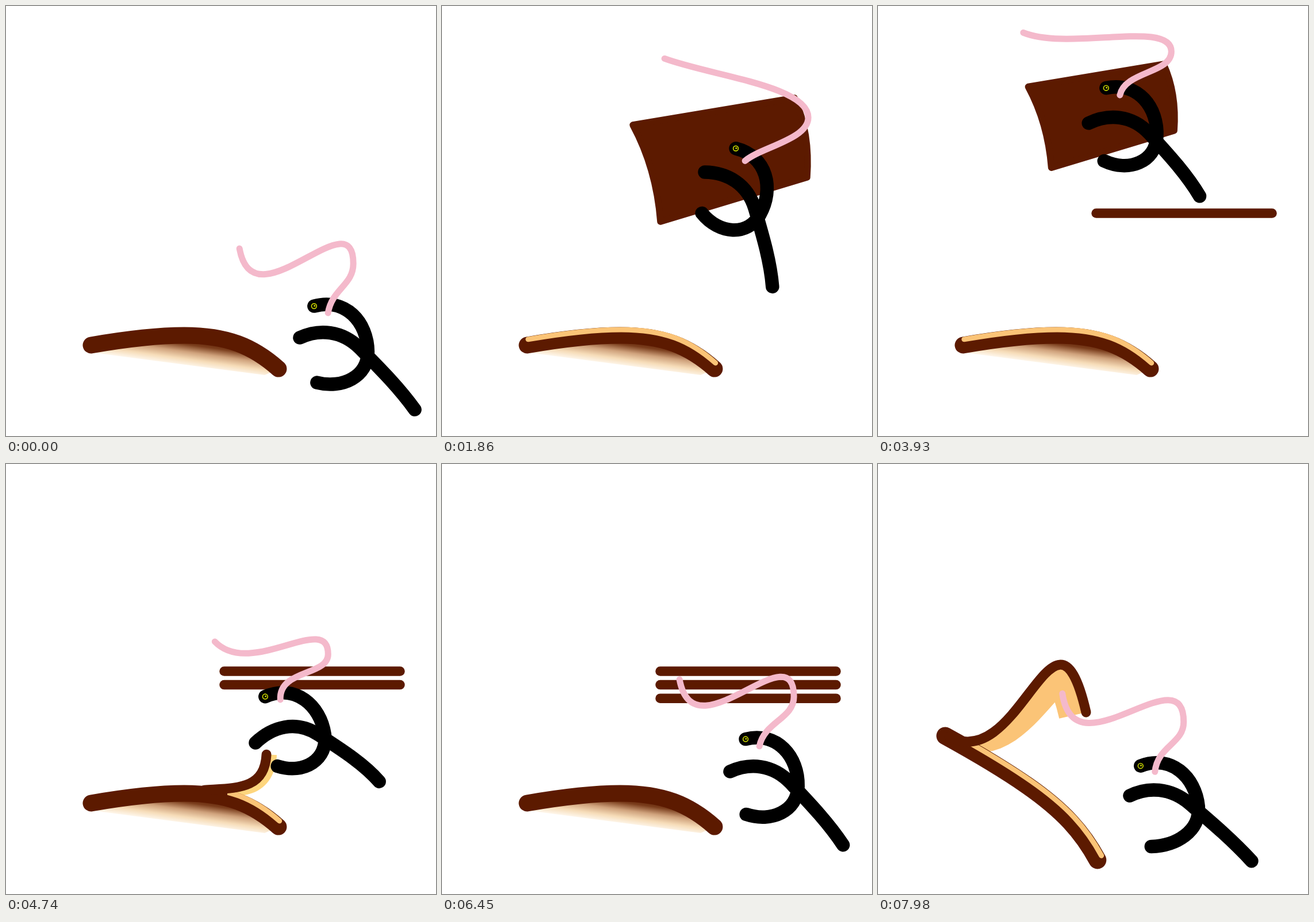
Recreate the animation shown at these times as an HTML page with a canvas. Size 748 px wide and 748 px high, loop 8000 ms.

```html
<!DOCTYPE html>
<html lang="en">
<head>
<meta charset="utf-8">
<title>Bark peeler</title>
<style>
html, body { margin: 0; width: 100%; height: 100%; overflow: hidden; background: #fff; }
canvas { display: block; width: 100vw; height: 100vh; }
</style>
</head>
<body>
<canvas id="stage" width="748" height="748"></canvas>
<script>
const ctx = document.getElementById('stage').getContext('2d');
const LOOP = 8000, CYCLE = 2160, STEP = 30;
const BARK = '#5c1a00', WOOD = '#fbc477', PINK = '#f4b9cb', EYE = '#c8d400';

const clamp = v => Math.max(0, Math.min(1, v));
const ramp = (t, a, b) => clamp((t - a) / (b - a));
const lerp = (a, b, k) => a + (b - a) * k;
const mix = (p, q, k) => [lerp(p[0], q[0], k), lerp(p[1], q[1], k)];
const polar = (length, degrees) =>
  [length * Math.cos(degrees * Math.PI / 180), length * Math.sin(degrees * Math.PI / 180)];
const add = (p, q) => [p[0] + q[0], p[1] + q[1]];
// Point at (along, across) in a frame with the given origin and direction.
const local = (origin, degrees, along, across) =>
  add(add(origin, polar(along, degrees)), polar(across, degrees + 90));

// Beak position, body angle and jaw opening; the ribbon has a reach, a tip and a wave.
const bird = (x, y, angle, jaw, reach, tipX, tipY, wave) =>
  ({ x, y, angle, jaw, reach, tipX, tipY, wave });
const ready = bird(511, 577, 32, .8, 44, -154, -112, 1);
const lift = bird(434, 485, 17.4, .1, 83, -114, -101, .5);
const pull = bird(191, 294, -19, 0, 153, -8, -99, 0);
const letGo = bird(298, 226, 13.2, .45, 81, -169, -67, .3);
const carry = bird(457, 289, 59.4, .5, 110, -140, -178, .25);
const dive = bird(501, 535, 33, .7, 60, -139, -116, 1);
const lunge = bird(438, 577, 28.2, 1.1, 50, -161, -136, 1.05);
const move = (pose, dx, dy) => ({ ...pose, x: pose.x + dx, y: pose.y + dy });

const birdStart = [
  [-30, dive], [0, ready], [90, move(ready, -12, 25)], [270, move(lift, 18, 108)],
  [420, lift], [810, move(pull, 22, 75)], [960, move(pull, -38, -11)],
  [1050, pull], [1140, letGo]];
const birdPeels = [...birdStart,
  [1230, move(letGo, 40, -21)], [1380, pull], [1500, move(pull, -71, 40)],
  [1710, move(letGo, 0, -49)], [1860, carry], [2040, move(dive, -20, -130)],
  [2130, dive], [2160, ready], [2250, move(ready, -12, 25)]];
const birdFails = [...birdStart, [1320, ready], [1380, ready], [1500, lunge]];

// Where the strip leaves the trunk, its heading at the tip, and its stiffness at both ends.
const strip = (root, heading, arm, grip, width) => ({ root, heading, arm, grip, width });
const stripStart = [
  [270, strip(420, 215, 15, 20, 4)], [420, strip(345, 93, 62, 55, 18)],
  [1050, strip(175, 114, 142, 135, 44)], [1140, strip(200, 162, 129, 145, 46)]];
const stripPeels = [...stripStart, [1380, stripStart[2][1]]];
const stripFails = [...stripStart, [1500, strip(155, 257, 240, 140, 48)]];

// Cubic interpolation through timed poses.
function sample(keys, t) {
  const last = keys.length - 1;
  if (t <= keys[0][0]) return keys[0][1];
  if (t >= keys[last][0]) return keys[last][1];
  const i = keys.findIndex(key => key[0] > t) - 1;
  const [ta, a] = keys[i], [tb, b] = keys[i + 1];
  const [tp, p] = keys[Math.max(0, i - 1)], [tn, n] = keys[Math.min(last, i + 2)];
  const h = tb - ta, u = (t - ta) / h, w = 1 - u;
  const at = k => a[k] * (1 + 2 * u) * w * w + b[k] * u * u * (3 - 2 * u) +
    h * u * w * (w * (b[k] - p[k]) / (tb - tp) - u * (n[k] - a[k]) / (tn - ta));
  return Object.fromEntries(Object.keys(a).map(k => [k, at(k)]));
}

// Starts a path of joined cubic curves: start, then control, control, end, ...
function curve(points) {
  ctx.beginPath();
  ctx.moveTo(...points[0]);
  for (let i = 1; i < points.length; i += 3) {
    ctx.bezierCurveTo(...points[i], ...points[i + 1], ...points[i + 2]);
  }
}

function stroke(color, width) {
  ctx.strokeStyle = color;
  ctx.lineWidth = width;
  ctx.stroke();
}

function fill(color) {
  ctx.fillStyle = color;
  ctx.fill();
}

function circle([x, y], r) {
  ctx.beginPath();
  ctx.arc(x, y, r, 0, 7);
}

const BODY = [[20, -30], [55, -49], [99, -39], [144, -28.5], [191, -18]];
const HEAD = [[-13, -55], [31, -92], [83, -90.5], [126, -89], [146, -43.5]];

const beakOf = pose => [pose.x, pose.y];
const jawOf = ({ x, y, angle, jaw }) => local([x, y], angle, 46 + 26 * jaw, 24 + 33 * jaw);

function drawBird(pose) {
  const { angle, jaw, reach, tipX, tipY, wave } = pose;
  const beak = beakOf(pose), chin = jawOf(pose);
  const eye = local(beak, angle, -8, -86 + 44 * jaw - 14 * jaw * jaw);
  const headAngle = Math.atan2(chin[1] - eye[1], chin[0] - eye[0]) * 180 / Math.PI;
  const arch = 1.22 - .25 * jaw;

  curve([beak, ...BODY.map(([u, v]) => local(beak, angle, u, v * arch)),
    local(beak, angle, 224 + 15 * jaw, 0)]);
  stroke('#000', 23.5);
  curve([eye, ...HEAD.map(([u, v]) => local(eye, headAngle, u, v)), chin]);
  stroke('#000', 23.5);
  circle(eye, 4.4);
  stroke(EYE, 1.7);
  circle(add(eye, [.8, -.6]), 1.5);
  fill(EYE);

  const base = add(eye, polar(27, angle - 6));
  const side = add(base, [reach, -72 - 14 * wave]);
  const tip = add(base, [tipX, tipY]);
  curve([base, add(base, [-15 + .7 * angle, -65 + .7 * angle]), add(side, [0, 38]), side,
    add(side, [0, -35 - 80 * wave]), add(tip, [100 - 75 * wave, -5 + 140 * wave]), tip]);
  stroke(PINK, 11);
}

const TRUNK = [[148, 590], [200, 581], [255, 573], [310, 573], [385, 573], [430, 592], [474, 631]];

// Maps a point of the resting trunk to the trunk as it is torn up and straightened.
function onTrunk([x, y], tilt) {
  const dx = x - 148, dy = y - 590, size = 1 + .04 * tilt;
  const along = dx * .992 + dy * .125, across = dy * .992 - dx * .125;
  return local([148 - 31 * tilt, 590 - 117 * tilt], 7.2 + 32 * tilt,
    along * size, across * size * (1 - .4 * tilt));
}

function drawShadow(tilt) {
  const place = p => onTrunk(p, tilt);
  const shade = ctx.createLinearGradient(...place([315, 627]), ...place([322, 577]));
  ['#fffaf2', '#f6dcb8', '#cfa27c', '#7a3d1c', BARK]
    .forEach((color, i) => shade.addColorStop(i / 4, color));
  ctx.globalAlpha = clamp(1 - 1.5 * tilt);
  curve(TRUNK.map(place));
  ctx.lineTo(...place([450, 642]));
  ctx.lineTo(...place([158, 604]));
  fill(shade);
  ctx.globalAlpha = 1;
}

function drawTrunk(tilt, bareFrom, bareAlpha) {
  const points = TRUNK.map(p => onTrunk(p, tilt));
  curve(points);
  stroke(BARK, 29 + 2 * tilt);
  ctx.save();
  ctx.globalAlpha = bareAlpha;
  ctx.beginPath();
  ctx.rect(onTrunk([bareFrom, 575], tilt)[0], 0, 748, 748);
  ctx.clip();
  curve(points.map(p => add(p, polar(10.3, 32 * tilt - 80))));
  stroke(WOOD, 9);
  ctx.restore();
}

// The strip runs as one cubic curve from its tip to its root on the trunk.
function stripCurve({ root, heading, arm, grip }, tip, tilt) {
  const foot = onTrunk([root, 567 + .0006 * (root - 330) ** 2], tilt);
  return [tip, add(tip, polar(arm, heading)), add(foot, polar(grip, 32 * tilt - 4)), foot];
}

function drawInside([a, b, c, d], width, aged) {
  const edge = [];
  for (let t = 1; t >= 0; t -= 1 / 32) {
    const p = mix(mix(a, b, t), mix(b, c, t), t), q = mix(mix(b, c, t), mix(c, d, t), t);
    const heading = Math.atan2(q[1] - p[1], q[0] - p[0]) * 180 / Math.PI;
    edge.push(add(mix(p, q, t), polar(width * (1 - t ** 4), heading - 90)));
  }
  curve([a, b, c, d]);
  edge.forEach(p => ctx.lineTo(...p));
  fill(`rgb(${254 - 3 * aged},${214 - 18 * aged},${126 - 7 * aged})`);
}

const slotY = n => 360.5 + 23.6 * n;

function drawPlate(n) {
  ctx.beginPath();
  ctx.moveTo(379.5, slotY(n));
  ctx.lineTo(685.5, slotY(n));
  stroke(BARK, 16.5);
}

const SHEET = [[332, 207], [613, 160], [635, 298], [380, 375]];
const GRIP_POINT = [456, 322];

// The sheet unrolls at the beak, then flattens into its slot.
function drawSheet(t, n, pose) {
  const size = lerp(.35, 1, ramp(t, 1590, 1830));
  const flat = 1 - (1 - ramp(t, 1860, 2130)) ** 2;
  const offset = t < 1860 ? [pose.x - carry.x, pose.y - carry.y] : [0, 0];
  const [a, b, c, d] = SHEET.map((corner, i) => {
    const held = add(mix(GRIP_POINT, corner, size), offset);
    return mix(held, [i % 3 ? 685.5 : 379.5, slotY(n)], flat);
  });
  const bow = (d[1] - a[1]) * .1;
  ctx.beginPath();
  ctx.moveTo(...a);
  ctx.lineTo(...b);
  ctx.quadraticCurveTo(...add(mix(b, c, .5), [bow, -bow / 2]), ...c);
  ctx.lineTo(...d);
  ctx.quadraticCurveTo(...add(mix(a, d, .5), [bow, -bow / 2]), ...a);
  ctx.closePath();
  fill(BARK);
  stroke(BARK, lerp(11.5, 16.5, flat));
}

function draw(time) {
  const cycle = Math.floor(time / CYCLE), t = time - cycle * CYCLE;
  const fails = cycle === 3;
  const pose = sample(fails ? birdFails : birdPeels, t);
  const peel = sample(fails ? stripFails : stripPeels, t);
  const tilt = fails ? ramp(t, 1200, 1500) ** 1.5 : 0;
  const detached = !fails && t >= 1590, peeling = t >= 270 && !detached;

  const regrab = fails ? 0 : ramp(t, 1230, 1380);
  const hold = Math.max(1 - ramp(t, 1050, 1140), regrab);
  const freeTip = mix([288, 321], [362, 432], fails ? ramp(t, 1140, 1500) : 0);
  const tip = mix(freeTip, mix(beakOf(pose), jawOf(pose), .5), hold);
  const spine = stripCurve(peel, tip, tilt);

  ctx.fillStyle = '#fff';
  ctx.fillRect(0, 0, 748, 748);
  ctx.lineCap = ctx.lineJoin = 'round';
  drawShadow(tilt);
  if (peeling) drawInside(spine, peel.width, ramp(t, 420, 800));
  drawTrunk(tilt, detached ? 100 : peel.root + 40, t < 270 ? 0 : 1 - ramp(t, 1900, 2100));
  if (peeling) {
    curve(spine);
    stroke(BARK, 17);
  }
  if (time < 7260) for (let n = 0; n < cycle; n++) drawPlate(n);
  if (detached) drawSheet(t, cycle, pose);
  drawBird(pose);
}

const start = performance.now();
function tick() {
  const time = (performance.now() - start) % LOOP;
  draw(Math.floor(time / STEP) * STEP);
  requestAnimationFrame(tick);
}
tick();
</script>
</body>
</html>
```
